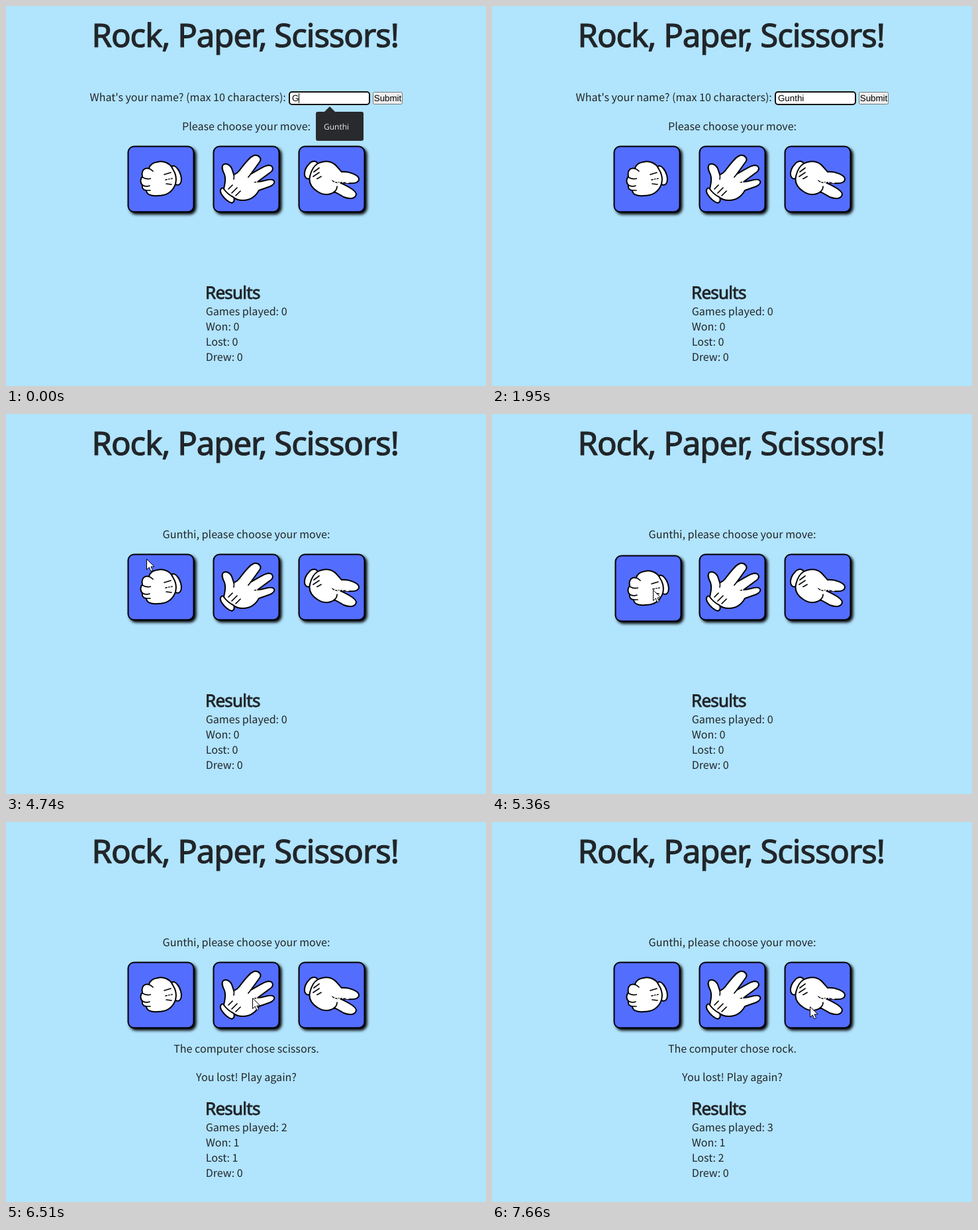
Recreate the animation shown at these times as an HTML page. Size 725 px wide and 575 px high, loop 8 s.

```html
<!DOCTYPE html>
<html lang="en">
<head>
<meta charset="utf-8">
<title>Rock, Paper, Scissors</title>
<style>
  html, body { margin: 0; width: 100%; height: 100%; overflow: hidden; background: #b1e4fd; }
  svg { display: block; width: 725px; height: 575px; }
  text { font: 16.1px "Noto Sans CJK JP", "Noto Sans CJK SC", "Noto Sans CJK", "Noto Sans", sans-serif;
    fill: #212529; text-rendering: geometricPrecision; white-space: pre; }
  .mid { text-anchor: middle; }
  .title, .head { font-family: "Noto Sans", "Open Sans", sans-serif; stroke: #212529; }
  .title { font-size: 49px; letter-spacing: -1px; stroke-width: 1.2px; }
  .head { font-size: 26px; letter-spacing: -.75px; stroke-width: .9px; }
  .field { font: 13.33px "Liberation Sans", Arial, sans-serif; fill: #000; }
  .hint { font: 12px "Open Sans", sans-serif; fill: #e8eaed; }
  .alt { font-size: 14.3px; fill: #fff; }
  .tile { fill: #526dff; stroke: #000; stroke-width: 2; filter: url(#shadow); }
  .glove { fill: #fff; stroke: #000; stroke-width: 2; stroke-linejoin: round; stroke-linecap: round; }
  .crease { fill: none; stroke-width: 1.7; }
</style>
</head>
<body>
<svg viewBox="0 0 725 575">
  <defs>
    <filter id="shadow" x="-10%" y="-10%" width="130%" height="130%">
      <feDropShadow dx="3" dy="3" stdDeviation="2" flood-color="#000"/>
    </filter>
    <rect id="tile" class="tile" y="212.5" width="99" height="99" rx="9"/>
  </defs>
  <rect width="725" height="575" fill="#b1e4fd"/>
  <text class="title" x="129.5" y="62">Rock, Paper, Scissors!</text>

  <g id="form">
    <text x="126.5" y="144">What's your name? (max 10 characters):</text>
    <rect x="428" y="130" width="121" height="19" rx="4" fill="#fff" stroke="#101010" stroke-width="2"/>
    <text id="typed" class="field" x="432" y="144"></text>
    <rect id="caret" y="132" width="1" height="15"/>
    <rect x="554.5" y="130.5" width="44" height="18" rx="2" fill="#efefef" stroke="#767676"/>
    <text class="field mid" x="576.5" y="144">Submit</text>
  </g>

  <text id="prompt" class="mid" x="363" y="188"></text>

  <g id="rock">
    <use href="#tile" x="184.5"/>
    <g class="glove">
      <path d="M249 247C248 242 254 240 258 245C264 251 267 264 263 269C260 272 257 271 254 268Z"/>
      <path d="M252 247C248 237 237 234 229 236C221 237 217 241 216 246C209 244 204 249 206 258C202 262 203 268 206 271C205 276 208 279 212 279C212 285 219 288 229 287C243 287 252 281 256 269C258 261 256 253 252 247Z"/>
      <path class="crease" d="M216 246Q219 247 222 250M206 259Q212 263 219 261M206 271Q211 274 217 272M212 279L218 279M239 255L249 252M241 263L251 261M242 269L250 270"/>
    </g>
    <text class="alt mid" x="234" y="268">Rock</text>
  </g>

  <g id="paper">
    <use href="#tile" x="313.5"/>
    <g class="glove">
      <path d="M329 276C325 274 322 279 325 284C329 291 336 297 341 298C345 297 346 292 343 288Z"/>
      <path d="M329 277C330 270 333 263 330 255C327 249 325 244 328 240C333 237 339 241 341 246L344 255Q349 254 354 247C361 238 368 228 375 226C382 225 387 231 383 236L370 254C380 249 389 242 396 241C404 241 405 248 399 252L380 266C389 266 397 261 403 263C408 266 404 271 399 273L382 279C377 288 369 294 358 294C351 294 346 292 343 289Q335 285 329 277Z"/>
      <path class="crease" d="M370 254L366 259M380 266L375 267M344 255Q345 259 344 262M336 277L342 271M341 283L349 275M347 287L354 280"/>
    </g>
    <text class="alt mid" x="363" y="268">Paper</text>
  </g>

  <g id="scissors">
    <use href="#tile" x="442.5"/>
    <g class="glove">
      <path d="M471 239C469 233 461 234 457 240C451 246 449 256 453 260C456 263 460 261 461 257Z"/>
      <path d="M470 239C480 233 492 234 499 242L507 251C519 250 533 256 533 262C533 268 524 269 516 268L504 267C515 272 529 279 529 285C527 293 518 292 510 289L496 281C490 286 480 287 471 281C461 275 457 267 459 258C461 249 464 243 470 239Z"/>
      <path class="crease" d="M496 281Q500 278 500 273M504 267Q497 268 493 264M465 251L473 245M464 258L473 252M469 262L476 258"/>
    </g>
    <text class="alt mid" x="492" y="268">Scissors</text>
  </g>

  <g id="popup">
    <path d="M480 161L489 152L498 161Z" fill="#292a2d"/>
    <rect x="468" y="160" width="72" height="44" rx="3" fill="#292a2d"/>
    <text class="hint" x="480" y="187">Gunthi</text>
  </g>

  <text id="choice" class="mid" x="363" y="349"></text>
  <text id="verdict" class="mid" x="363" y="392"></text>
  <text class="head" x="301" y="443">Results</text>
  <text id="played" x="301.7" y="468"></text>
  <text id="won" x="301.7" y="491"></text>
  <text id="lost" x="301.7" y="514"></text>
  <text id="drew" x="301.7" y="537"></text>

  <path id="cursor" d="M.5 .5V16.5L4.2 13L7 18.8L9.6 17.6L6.9 12H12Z" fill="#fff" stroke="#000"/>
</svg>
<script>
const LOOP = 8000, STEP = 68, BLINK = 530, SUBMIT = 3540;
const NAME = "Gunthi";
const MOVES = ["rock", "paper", "scissors"];
const keyTimes = [410, 680, 1010, 1280, 1420];
const lastKey = keyTimes.at(-1);

// The player picks the moves in order; the score follows from the replies.
const rounds = [
  { down: 5290, up: 5430, reply: "scissors" },
  { down: 6440, up: 6510, reply: "scissors" },
  { down: 7520, up: 7660, reply: "rock" }
].map((round, i) => ({
  ...round,
  move: MOVES[i],
  outcome: ["drew", "won", "lost"][(i - MOVES.indexOf(round.reply) + 3) % 3]
}));

const linear = p => p;
const easeOut = p => 1 - (1 - p) ** 1.3;
const smooth = p => p * p * (3 - 2 * p);
const entry = { time: 4400, x: 477, y: -16 };
const legs = [
  { time: 4400, steps: 2, x: 179, y: 168, ease: linear },
  { time: 4540, steps: 7, x: 243, y: 266, ease: easeOut },
  { time: 5820, steps: 6, x: 372, y: 266, ease: smooth },
  { time: 7040, steps: 4, x: 480, y: 279, ease: smooth }
];

const el = id => document.getElementById(id);
const show = (id, alpha) => el(id).setAttribute("opacity", Number(alpha));
const place = (id, x, y) => el(id).setAttribute("transform", `translate(${x} ${y})`);
function write(id, text) {
  if (el(id).textContent !== text) el(id).textContent = text;
}

const stepsSince = (t, time) => Math.floor((t - time) / STEP + .1);

function pointerAt(t) {
  let { x, y } = entry;
  for (const leg of legs) {
    if (t < leg.time) break;
    const p = leg.ease(Math.min(1, stepsSince(t, leg.time) / leg.steps));
    x += (leg.x - x) * p;
    y += (leg.y - y) * p;
  }
  return [Math.round(x), Math.round(y)];
}

function renderForm(t) {
  const idle = Math.max(0, t - lastKey);
  write("typed", NAME.slice(0, 1 + keyTimes.filter(k => k <= t).length));
  el("caret").setAttribute("x", Math.floor(432 + el("typed").getComputedTextLength()));
  show("caret", Math.floor(idle / BLINK) % 2 === 0);
  show("popup", t < lastKey ? 1 : Math.max(0, 1 - stepsSince(t, lastKey) / 4));
  show("form", t < SUBMIT);
  write("prompt", t < SUBMIT ? "Please choose your move:" : `${NAME}, please choose your move:`);
}

function renderGame(t) {
  for (const { move, down, up } of rounds) {
    const shift = t >= down && t < up ? 2 : 0;
    place(move, shift, shift);
  }
  const done = rounds.filter(r => r.up <= t);
  const last = done.at(-1);
  const score = outcome => done.filter(r => r.outcome === outcome).length;
  write("choice", last ? `The computer chose ${last.reply}.` : "");
  write("verdict", last ? `You ${last.outcome}! Play again?` : "");
  write("played", `Games played: ${done.length}`);
  write("won", `Won: ${score("won")}`);
  write("lost", `Lost: ${score("lost")}`);
  write("drew", `Drew: ${score("drew")}`);
}

function render(t) {
  renderForm(t);
  renderGame(t);
  show("cursor", t >= entry.time);
  place("cursor", ...pointerAt(t));
}

const start = performance.now();
function tick() {
  render((performance.now() - start) % LOOP);
  requestAnimationFrame(tick);
}
tick();
</script>
</body>
</html>
```
